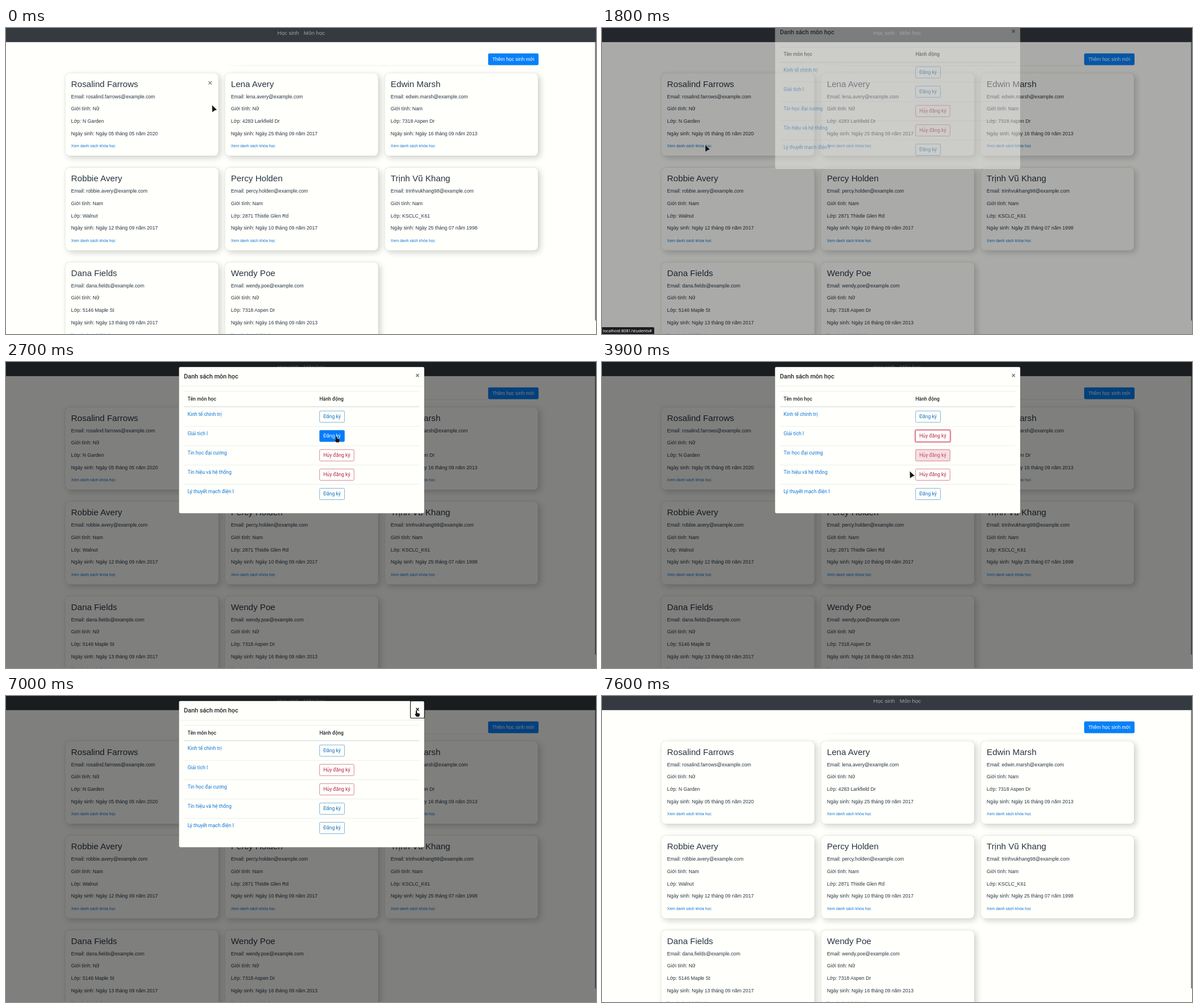
These frames come from a looping animation (1038 px wide and 539 px high, 8.1 s). An HTML page:

```html
<!DOCTYPE html>
<html lang="vi">
<head>
<meta charset="utf-8">
<title>Danh sách học sinh</title>
<style>
* { box-sizing: border-box; }
html, body { margin: 0; width: 1038px; height: 539px; overflow: hidden; background: #fffffb; }
#page { position: absolute; width: 1920px; height: 997px; overflow: hidden; transform: scale(.540625); transform-origin: 0 0;
  background: #fffffb; font: 16px/24px "Liberation Sans", Arial, sans-serif; color: #273542; white-space: nowrap; }
#page > * { position: absolute; }
nav { left: 0; top: 0; width: 1920px; height: 46px; background: #343a40; color: rgba(255,255,255,.52); font-size: 18px; }
nav span { position: absolute; top: 4px; }
#bar { left: 1917px; top: 46px; width: 3px; height: 907px; background: #6d6f72; }
#edge { left: 700px; top: 121px; width: 868px; height: 3px; background: linear-gradient(90deg, transparent, rgba(0,0,0,.05) 10%); }
#add { left: 1569px; top: 83px; width: 163.5px; height: 38px; line-height: 38px; border-radius: 4px; background: #0880f8; color: #fff; text-align: center; }
#add.focus { background: #006fdf; box-shadow: 0 0 0 3.2px rgba(38,143,255,.5); }
.card { width: 500px; height: 271px; padding: 19px; border: 1px solid rgba(0,0,0,.14); border-radius: 15px;
  background: #fffffb; box-shadow: 7px 7px 20px rgba(0,0,0,.18); }
.card h3 { margin: 0 0 12px; font: 28px/33.6px "Liberation Sans", Arial, sans-serif; }
.card p { margin: 0 0 16px; }
a { color: #0f76d6; }
.card a { font-size: 12.8px; }
.card a.over { text-decoration: underline; }
.close { position: absolute; font-weight: bold; font-size: 24px; opacity: .6; text-align: center; }
.card .close { left: 459px; top: 14px; width: 24px; line-height: 36px; visibility: hidden; }
#shade { inset: 0; background: #000; }
#modal { left: 562px; top: 15px; width: 800px; height: 479px; border: 1px solid rgba(0,0,0,.2); border-radius: 5px;
  background: #fffffb; background-clip: padding-box; color: #212529; font-family: Roboto, sans-serif; }
#modal header { height: 63px; padding: 16px; border-bottom: 1px solid #dee2e6; font-size: 20px; font-weight: 500; line-height: 30px; }
#modal .close { left: 753px; top: 0; width: 46px; height: 56px; line-height: 56px; border-radius: 4px; }
#modal .close.focus { outline: 2.5px solid #111; outline-offset: -1px; }
.row { position: relative; margin: 0 16px; height: 63px; border-top: 1px solid #dee2e6; }
.head { margin-top: 16px; height: 51px; font-weight: 500; border-bottom: 2px solid #dee2e6; }
.row > * { position: absolute; left: 12px; top: 12px; }
.row > :last-child { left: 441px; }
.btn { --c: #1273c4; --f: #007bff; --ring: rgba(0,123,255,.5); --h: 0%; padding: 0 11.5px; height: 38px; line-height: 35px;
  border: 1.5px solid var(--c); border-radius: 4px;
  color: color-mix(in srgb, #fff var(--h), var(--c)); background: color-mix(in srgb, var(--f) var(--h), #fffffb); }
.btn.red { --c: #b4234a; --f: #cb3a56; --ring: rgba(220,53,90,.5); }
.btn.focus { box-shadow: 0 0 0 3.2px var(--ring); }
#status { left: 0; bottom: 0; width: 170px; height: 22.5px; padding-left: 3px; border-radius: 0 4px 0 0;
  background: #1b1c1d; color: #fff; font: 13.4px/22px "Noto Sans", sans-serif; }
#cursor { position: absolute; left: 0; top: 0; overflow: visible; }
#cursor path { fill: #161616; stroke: #fff; stroke-width: .7; paint-order: stroke; }
</style>
</head>
<body>
<div id="page">
  <nav><span style="left:883px">Học sinh</span><span style="left:969px">Môn học</span></nav>
  <div id="edge"></div>
  <div id="add">Thêm học sinh mới</div>
  <div id="bar"></div>
  <div id="shade"></div>
  <div id="modal">
    <header>Danh sách môn học<span class="close">×</span></header>
    <div class="row head"><span>Tên môn học</span><span>Hành động</span></div>
  </div>
  <div id="status">localhost:8081/students#</div>
</div>
<svg id="cursor" width="1" height="1">
  <path id="arrow" d="M0 0L8.6 8.3L4.8 8.9L.4 12.2Z"/>
  <path id="hand" d="M0 0Q1.2 0 1.2 1.2V4L5 4.8Q6.2 5.1 6 6.4L5 10.5H0L-2.8 6.3Q-2.8 4.8-1.1 5.8V1.2Q-1.1 0 0 0Z"/>
</svg>
<script>
const $ = s => document.querySelector(s);
const LOOP = 8100, STEP = 100, CARD_W = 520, CARD_H = 308, SCALE = .540625;

// Moments of the clicks
const OPEN = 1500, ENROL = 3500, LEAVE = 5400, CLOSE = 6900;

const students = [
  ['Rosalind Farrows', 'Nữ', 'N Garden', '05 tháng 05 năm 2020'],
  ['Lena Avery', 'Nữ', '4283 Larkfield Dr', '25 tháng 09 năm 2017'],
  ['Edwin Marsh', 'Nam', '7318 Aspen Dr', '16 tháng 09 năm 2013'],
  ['Robbie Avery', 'Nam', 'Walnut', '12 tháng 09 năm 2017'],
  ['Percy Holden', 'Nam', '2871 Thistle Glen Rd', '10 tháng 09 năm 2017'],
  ['Trịnh Vũ Khang', 'Nam', 'KSCLC_K61', '25 tháng 07 năm 1998', 'trinhvukhang98'],
  ['Dana Fields', 'Nữ', '5146 Maple St', '13 tháng 09 năm 2017'],
  ['Wendy Poe', 'Nữ', '7318 Aspen Dr', '16 tháng 09 năm 2013'],
];
const cards = students.map(([name, sex, room, born, mail], i) => {
  const card = document.createElement('div');
  card.className = 'card';
  card.style.left = 192 + i % 3 * CARD_W + 'px';
  card.style.top = 146 + Math.floor(i / 3) * CARD_H + 'px';
  const user = mail || name.toLowerCase().replace(' ', '.');
  card.innerHTML = `<span class="close">×</span><h3>${name}</h3><p>Email: ${user}@example.com</p>
    <p>Giới tính: ${sex}</p><p>Lớp: ${room}</p><p>Ngày sinh: Ngày ${born}</p><p><a>Xem danh sách khóa học</a></p>`;
  $('#page').insertBefore(card, $('#bar'));
  return card;
});

const courses = ['Kinh tế chính trị', 'Giải tích I', 'Tin học đại cương', 'Tín hiệu và hệ thống', 'Lý thuyết mạch điện I'];
const buttons = courses.map(name => {
  const row = document.createElement('div');
  row.className = 'row';
  row.innerHTML = `<a>${name}</a><span class="btn"></span>`;
  $('#modal').append(row);
  return row.lastChild;
});

const ramp = (t, start, length) => Math.min(1, Math.max(0, (t - start) / length));
const smooth = p => p * p * (3 - 2 * p);
const easeOut = p => 1 - (1 - p) ** 1.8;
const inBox = ([x, y], left, top, w, h) => x >= left && x < left + w && y >= top && y < top + h;

// Pointer moves: start, end, x, y
const moves = [
  [0, 100, 357.5, 138], [200, 600, 740, 210], [600, 800, 600, 318], [800, 1100, 193, 209], [1100, 1300, 181.5, 206],
  [1900, 2300, 527, 163], [2300, 2700, 581, 131], [3550, 3900, 541.5, 192.5], [3900, 4100, 470, 255],
  [4100, 4400, 544.5, 263], [4600, 5175, 581.5, 204], [5500, 5800, 637, 167], [5900, 6350, 722, 26], [7300, 7500, 724, 4],
];
function pointer(t) {
  let x = 362.5, y = 136;
  for (const [start, end, toX, toY] of moves) {
    const p = smooth(ramp(t, start, end - start));
    x += (toX - x) * p;
    y += (toY - y) * p;
  }
  return [x, y];
}

const isRed = (i, t) => i === 2 || i === 1 && t >= ENROL || i === 3 && t < LEAVE;
const onButton = (i, t) => t > OPEN && inBox(pointer(t), 551.5, 86.3 + i * 34.06, isRed(i, t) ? 61.5 : 45, 20.5);

// A hover fade is the share of the last 150 ms spent on the button
function hover(i, t) {
  const samples = 30;
  let hits = 0;
  for (let k = 0; k < samples; k++) hits += onButton(i, t - k * 150 / samples);
  return hits / samples;
}

function draw(t) {
  const at = pointer(t), [x, y] = at;
  const onLink = t < OPEN && inBox(at, 115, 203, 79, 10);
  const onClose = t > OPEN && inBox(at, 712, 9, 25, 30);
  const hand = onLink || onClose || buttons.some((b, i) => onButton(i, t));
  $('#cursor').style.transform = `translate(${x}px,${y}px)`;
  $('#cursor').style.display = t < 7500 ? '' : 'none';
  $('#arrow').style.display = hand ? 'none' : '';
  $('#hand').style.display = hand ? '' : 'none';

  cards.forEach((card, i) => {
    const over = t < OPEN && inBox([x / SCALE, y / SCALE], card.offsetLeft, card.offsetTop, 500, 271);
    card.querySelector('.close').style.visibility = over ? 'visible' : 'hidden';
  });
  cards[0].querySelector('a').classList.toggle('over', onLink);
  $('#add').classList.toggle('focus', t >= OPEN && t < OPEN + 300);
  $('#status').style.display = t >= OPEN && t < OPEN + 800 ? '' : 'none';

  const lift = 1 - easeOut(ramp(t, OPEN + 240, 300)) + easeOut(ramp(t, CLOSE + 100, 300));
  $('#shade').style.opacity = (ramp(t, OPEN + 200, 150) - ramp(t, CLOSE + 200, 100)) / 2;
  $('#modal').style.opacity = ramp(t, OPEN + 240, 150) - ramp(t, CLOSE + 100, 150);
  $('#modal').style.transform = `translateY(${-50 * lift}px)`;
  const close = $('#modal .close');
  close.style.opacity = onClose ? 1 : .6;
  close.classList.toggle('focus', t >= CLOSE);

  const focus = t < ENROL - 600 || t >= CLOSE ? -1 : t < LEAVE ? 1 : 3;
  buttons.forEach((b, i) => {
    b.textContent = isRed(i, t) ? 'Hủy đăng ký' : 'Đăng ký';
    b.classList.toggle('red', isRed(i, t));
    b.classList.toggle('focus', i === focus);
    b.style.setProperty('--h', hover(i, t) * 100 + '%');
  });
}

function tick() {
  draw(Math.floor(performance.now() % LOOP / STEP) * STEP);
  requestAnimationFrame(tick);
}
tick();
</script>
</body>
</html>
```
